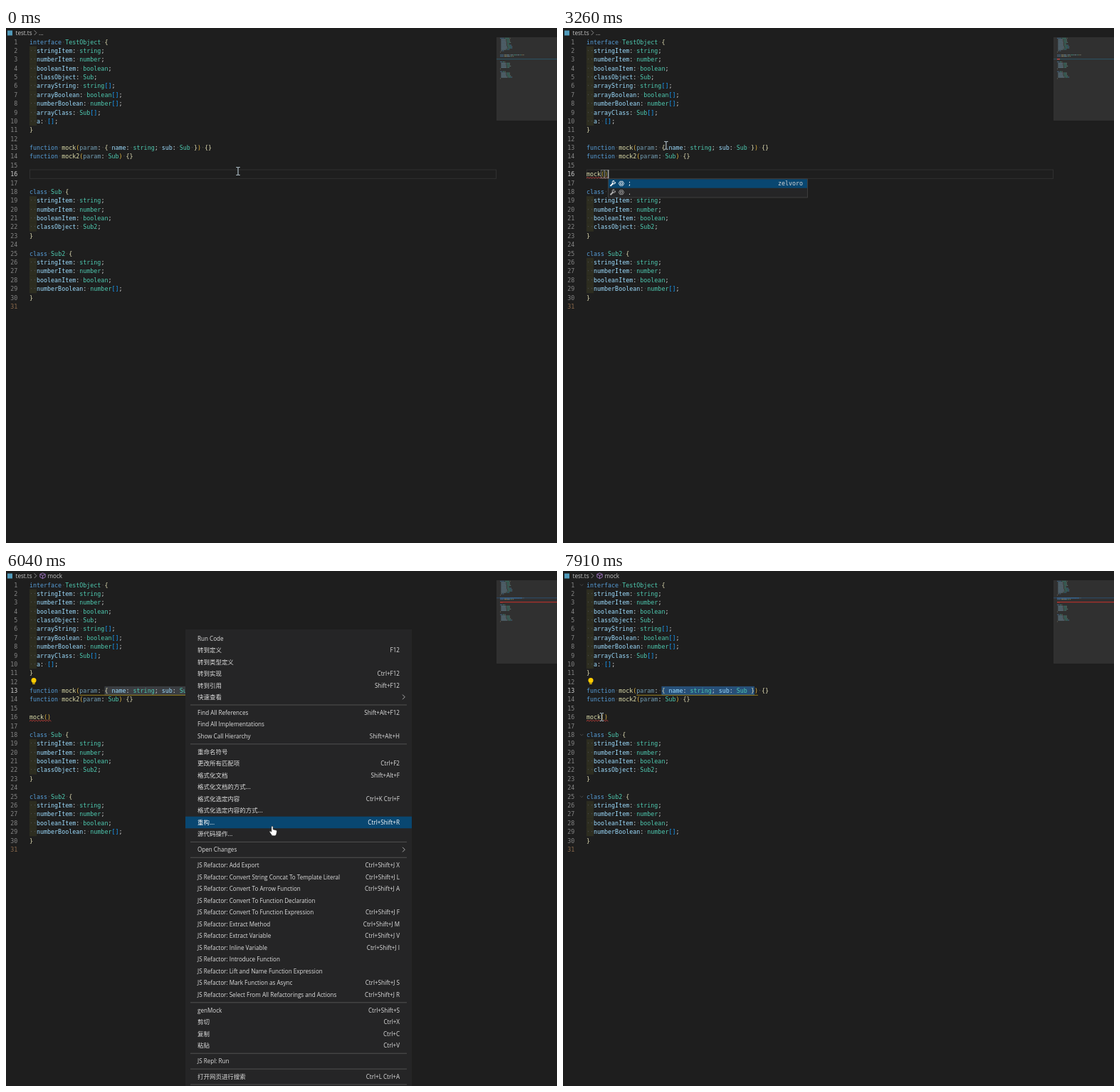
Animation of 774 by 723 pixels, one loop 8 s. Source, as an HTML page:

```html
<!DOCTYPE html>
<html lang="en">
<head>
<meta charset="utf-8">
<title>Editor session</title>
<style>
html, body { margin: 0; width: 100%; height: 100%; overflow: hidden; background: #1e1e1e; }
svg { display: block; width: 774px; height: 723px; }
text { white-space: pre; }
.code { font: 8.34px "DejaVu Sans Mono", "Noto Sans Mono", monospace; }
.ui { font: 8.1px "Open Sans", "Noto Sans CJK SC", sans-serif; }
.cjk { font-size: 8.47px; font-family: "Noto Sans CJK SC", "Noto Sans CJK", sans-serif; }
</style>
</head>
<body>
<svg id="stage" viewBox="0 0 774 723"></svg>
<script>
const LOOP = 8000, LEFT = 33, CHAR = 5.02, ROW = 12.38;
const MENU_ROW = 16.52, MENU_GAP = 5.33;
const stage = document.getElementById('stage');

function make(parent, tag, attrs = {}, text) {
  const node = document.createElementNS('http://www.w3.org/2000/svg', tag);
  for (const key in attrs) node.setAttribute(key, attrs[key]);
  if (text !== undefined) node.textContent = text;
  return parent.appendChild(node);
}
const group = (parent = stage, attrs) => make(parent, 'g', attrs);
const rect = (parent, x, y, width, height, fill, more) =>
  make(parent, 'rect', { x, y, width, height, fill, ...more });
const label = (parent, x, y, text, fill, cls, more) =>
  make(parent, 'text', { x, y, fill, class: cls, ...more }, text);
const line = (parent, d, stroke, width = 0.8, more) =>
  make(parent, 'path', { d, stroke, 'stroke-width': width, fill: 'none', ...more });
const show = (node, on) => node.setAttribute('visibility', on ? 'visible' : 'hidden');
const fade = (node, amount) => node.setAttribute('opacity', amount);
const place = (node, x, y) => node.setAttribute('transform', `translate(${x} ${y})`);

const colX = col => LEFT + col * CHAR;
const rowY = n => 19.5 + (n - 1) * ROW;
const rowTop = n => rowY(n) - ROW / 2;
const miniY = n => 13.9 + (n - 1) * 1.95;

const source = `interface TestObject {
  stringItem: string;
  numberItem: number;
  booleanItem: boolean;
  classObject: Sub;
  arrayString: string[];
  arrayBoolean: boolean[];
  numberBoolean: number[];
  arrayClass: Sub[];
  a: [];
}

function mock(param: { name: string; sub: Sub }) {}
function mock2(param: Sub) {}



class Sub {
  stringItem: string;
  numberItem: number;
  booleanItem: boolean;
  classObject: Sub2;
}

class Sub2 {
  stringItem: string;
  numberItem: number;
  booleanItem: boolean;
  numberBoolean: number[];
}
`.split('\n');

function colorOf(token, next) {
  if (/^\s/.test(token)) return '#494949';
  if (/^(interface|function|class)$/.test(token)) return '#569cd6';
  if (/^\w/.test(token)) return next === ':' ? '#9cdcfe' : next === '(' ? '#dcdcaa' : '#4ec9b0';
  if (/[[\]]/.test(token)) return '#179fff';
  if (/[()]/.test(token)) return '#e2b340';
  return /[{}]/.test(token) ? '#dfdbb2' : '#d4d4d4';
}

// Backgrounds that lie beneath the text
const minimap = group();
rect(minimap, 689, 13, 85, 117, '#303030');
const currentLine = rect(stage, LEFT + 0.5, 0, 655, ROW, 'none', { stroke: '#303030' });
const selection = rect(stage, colX(21), rowTop(13), 0, ROW, '#264f78');
const code = group();
const numbers = [];

source.forEach((content, i) => {
  const n = i + 1, y = rowY(n) + 3;
  numbers.push(label(code, 16.3, y, n, '#858585', 'code', { 'text-anchor': 'end' }));
  if (content.startsWith(' ')) rect(code, LEFT, rowTop(n), 10, ROW, '#2d2d20');
  const row = make(code, 'text', { y, class: 'code' });
  const tokens = content.match(/ +|\w+|\W/g) || [];
  let col = 0;
  tokens.forEach((token, k) => {
    const fill = colorOf(token, tokens[k + 1]);
    const blank = token[0] === ' ';
    make(row, 'tspan', { x: colX(col), fill, 'fill-opacity': token === 'param' ? 0.67 : 1 },
      blank ? '·'.repeat(token.length) : token);
    if (!blank) rect(minimap, 694 + col * 0.66, miniY(n), token.length * 0.66, 1, fill, { opacity: 0.5 });
    col += token.length;
  });
});

const miniCurrent = rect(minimap, 689, 0, 85, 1.3, '#2c5566', { opacity: 0.8 });
const miniSelection = rect(minimap, 694, miniY(13), 0, 1.3, '#35628d');
const miniTyped = rect(minimap, 694, miniY(16), 0, 1.2, '#a5a58a');
const miniError = rect(minimap, 694, miniY(16) - 0.2, 80, 1.4, '#a3302b');

// Breadcrumb
rect(stage, 2, 3.5, 7, 7, '#519aba');
label(stage, 13.6, 9.9, 'test.ts', '#c4c4c4', 'ui');
line(stage, 'M39.7 3.4l3.2 3.3-3.2 3.3', '#a8a8a8');
const crumbDots = label(stage, 46, 9.9, '...', '#c4c4c4', 'ui');
const crumbMock = group();
const cube = (parent, x, y, stroke) =>
  line(parent, `M${x} ${y - 4}l3.7 1.8v4l-3.7 2-3.7-2v-4zM${x - 3.7} ${y - 2.2}l3.7 1.8 3.7-1.8M${x} ${y - 0.4}v4.2`, stroke, 0.8);
cube(crumbMock, 51.5, 6.8, '#b180d7');
label(crumbMock, 58.6, 9.9, 'mock', '#c4c4c4', 'ui');

// Typed call on line 16
const typed = make(stage, 'text', { y: rowY(16) + 3, class: 'code' });
const typedName = make(typed, 'tspan', { x: LEFT, fill: '#dcdcaa' });
const typedParens = make(typed, 'tspan', { x: colX(4), fill: '#e2b340' }, '()');
const squiggle = line(stage, `M${LEFT} 211` + 'l1.9-1.7 1.9 1.7'.repeat(8), '#e0473f', 0.8);

const bracketBox = (parent, col, row) =>
  rect(parent, colX(col) + 0.3, rowTop(row) + 0.6, CHAR - 0.4, ROW - 1.2, '#0640061a', { stroke: '#888', 'stroke-width': 0.7 });
const callBoxes = group();
[4, 5].forEach(col => bracketBox(callBoxes, col, 16));
const paramBoxes = group();
[21, 46].forEach(col => bracketBox(paramBoxes, col, 13));
const pairGuide = line(stage, `M${colX(14)} 174.3H${colX(48)}`, '#a98b1e', 0.9);

const bulb = group();
make(bulb, 'circle', { cx: 39, cy: 153.4, r: 3.5, fill: '#ffcc00' });
rect(bulb, 37.3, 156, 3.4, 3, '#ffcc00');
line(bulb, 'M37.3 157.6h3.4', '#1e1e1e', 0.6);

const folds = group();
[1, 18, 25].forEach(n => line(folds, `M24 ${rowY(n) - 1}l2.2 2.2 2.2-2.2`, '#b0b0b0'));
const caret = rect(stage, 0, 0, 1.3, ROW, '#aeafad');

// Completion lists
function popup(x, rows, drawRow) {
  const box = group();
  rect(box, x, 211.8, 280, rows.length * ROW + 1.4, '#252526', { stroke: '#454545', 'stroke-width': 0.8 });
  rect(box, x + 0.5, 212.3, 279, ROW, '#094771');
  rows.forEach((text, i) => {
    const y = 218.3 + i * ROW;
    drawRow(box, y, i ? '#b0b0b0' : '#fff');
    label(box, x + (x > 50 ? 27.5 : 17), y + 3, text, i ? '#d4d4d4' : '#fff', 'code');
  });
  return box;
}
const nameIcon = (box, y) => cube(box, 42, y, '#b180d7');
const names = 'mock mock2 module Map Math MediaError MediaList MessageEvent MimeType MouseEvent moveBy moveTo'.split(' ');
const longList = popup(33.5, names, nameIcon);
const shortList = popup(33.5, ['mock', 'mock2', 'MouseEvent', 'module', 'moveBy', 'moveTo'], nameIcon);
const endList = popup(63.5, [';', '.'], (box, y, color) => {
  line(box, `M66.5 ${y + 3.6}l4.2-4.2`, color, 2);
  line(box, `M73.7 ${y - 1.8}a2.3 2.3 0 1 1-2-2.2l-.5 1.8 1 1z`, color, 0.9);
  line(box, `M80 ${y - 3}h4l1.7 3-1.7 3h-4l-1.7-3zM80.4 ${y - 1.2}h3.2v2.4h-3.2z`, color, 0.8);
});
label(endList, 337, 221.3, 'zelvoro', '#d4d4d4', 'code', { 'text-anchor': 'end' });

// Context menu
const menuText = `Run Code
转到定义|F12
转到类型定义
转到实现|Ctrl+F12
转到引用|Shift+F12
快速查看|>
-
Find All References|Shift+Alt+F12
Find All Implementations
Show Call Hierarchy|Shift+Alt+H
-
重命名符号
更改所有匹配项|Ctrl+F2
格式化文档|Shift+Alt+F
格式化文档的方式...
格式化选定内容|Ctrl+K Ctrl+F
格式化选定内容的方式...
重构...|Ctrl+Shift+R
源代码操作...
-
Open Changes|>
-
JS Refactor: Add Export|Ctrl+Shift+J X
JS Refactor: Convert String Concat To Template Literal|Ctrl+Shift+J L
JS Refactor: Convert To Arrow Function|Ctrl+Shift+J A
JS Refactor: Convert To Function Declaration
JS Refactor: Convert To Function Expression|Ctrl+Shift+J F
JS Refactor: Extract Method|Ctrl+Shift+J M
JS Refactor: Extract Variable|Ctrl+Shift+J V
JS Refactor: Inline Variable|Ctrl+Shift+J I
JS Refactor: Introduce Function
JS Refactor: Lift and Name Function Expression
JS Refactor: Mark Function as Async|Ctrl+Shift+J S
JS Refactor: Select From All Refactorings and Actions|Ctrl+Shift+J R
-
genMock|Ctrl+Shift+S
剪切|Ctrl+X
复制|Ctrl+C
粘贴|Ctrl+V
-
JS Repl: Run
-
打开网页进行搜索|Ctrl+L Ctrl+A
-`;
const menu = group();
rect(menu, 252, 82, 318, 641, '#252526');
const menuHover = rect(menu, 252, 0, 318, MENU_ROW, '#094771');
const menuRows = [];
let menuY = 94.5;
for (const entry of menuText.split('\n')) {
  if (entry === '-') {
    line(menu, `M259 ${menuY - 5.6}H563`, '#5c5c5c');
    menuY += MENU_GAP;
    continue;
  }
  const [name, keys] = entry.split('|');
  const item = group(menu);
  const cjk = name.charCodeAt(0) > 255;
  make(item, 'text', { x: 269, y: menuY + 3, class: cjk ? 'ui cjk' : 'ui' }, name);
  if (keys === '>') line(item, `M557 ${menuY - 3.5}l3.3 3.3-3.3 3.3`, '#ccc');
  else if (keys) make(item, 'text', { x: 553, y: menuY + 3, class: 'ui', 'text-anchor': 'end' }, keys);
  menuRows.push({ y: menuY, item });
  menuY += MENU_ROW;
}

// Pointer shapes
const clickDot = make(stage, 'circle', { r: 8, fill: '#e0d800', opacity: 0.68 });
const beam = group();
const beamPath = 'M-2.6-5.4h1.8L0-4.8.8-5.4h1.8M0-4.8V4.8M-2.6 5.4h1.8L0 4.8l.8.6h1.8';
line(beam, beamPath, '#10151a', 1.8);
line(beam, beamPath, '#d5e4ea', 1);
const hand = group();
make(hand, 'path', {
  d: 'M-1.2.8q1.2-1.6 2.4 0v4l4 1q1.6.5 1.4 2l-.8 3.6q-.4 2-2 2.4h-3q-1 0-1.8-1.2l-3-4.5q0-1.6 1.8-.8l1 1z',
  fill: '#fff', stroke: '#111', 'stroke-width': 0.6
});
const arrow = group();
make(arrow, 'path', { d: 'M0 0v10.5l-2.5-2.2-1.8 4-1.6-.7 1.7-3.9h-3.4z', fill: '#fff', stroke: '#111', 'stroke-width': 0.6 });

const route = [
  [2350, 326, 201], [2780, 225, 112], [3180, 146, 164], [3500, 139, 169],
  [4940, 139, 169], [5250, 270, 166], [5420, 270, 166], [5660, 251, 168],
  [5870, 251, 168], [6040, 374, 358], [6590, 318, 614], [6670, 317, 614.5],
  [6980, 317, 614.5], [7420, 22, 245], [7580, 24, 214], [7750, 54.5, 205]
];
const between = (t, from, to) => t >= from && t < to;
const ramp = (t, from, to) => {
  const u = Math.min(1, Math.max(0, (t - from) / (to - from)));
  return u * u * (3 - 2 * u);
};
function pointerAt(t) {
  const next = route.findIndex(stop => stop[0] > t);
  if (next === 0) return route[0].slice(1);
  if (next < 0) return route[route.length - 1].slice(1);
  const a = route[next - 1], b = route[next], u = ramp(t, a[0], b[0]);
  return [a[1] + (b[1] - a[1]) * u, a[2] + (b[2] - a[2]) * u];
}
function blink(t) {
  const u = ((t % 1000) + 1000) % 1000;
  return 1 - ramp(u, 100, 300) + ramp(u, 700, 900);
}
function caretOpacity(t) {
  if (t < 520) return blink(t + 660);
  if (t < 2300) return 1;
  if (t < 4100) return blink(t - 2300);
  if (t < 4940) return blink(t - 3800);
  return t < 5420 ? 1 : blink(t - 5420);
}

function draw(t) {
  const [x, y] = pointerAt(t);
  const clicked = t >= 4100, selecting = t >= 4940;
  const menuOpen = between(t, 5890, 6980);
  const activeRow = clicked ? 13 : 16;

  // Typing
  const letters = [520, 840, 1050, 1390].filter(at => t >= at).length;
  typedName.textContent = 'mock'.slice(0, letters);
  show(typedParens, t >= 1620);
  show(squiggle, t >= 2090);
  show(callBoxes, between(t, 1620, 4100));
  show(longList, between(t, 600, 1220));
  show(shortList, between(t, 1220, 1620));
  show(endList, between(t, 1800, 4100));
  const typedCols = t >= 1710 ? 6 : t >= 1620 ? 5 : letters;

  // Editor state
  numbers.forEach((node, i) => node.setAttribute('fill',
    i + 1 === activeRow ? '#d0d0d0' : i === 30 ? '#8b6a4c' : '#858585'));
  show(currentLine, !selecting);
  currentLine.setAttribute('y', rowTop(activeRow));
  const cols = selecting ? Math.min(26, Math.max(0, Math.round((x - colX(21)) / CHAR))) : 0;
  const selected = t >= 5250 ? 26 : cols;
  selection.setAttribute('width', selected * CHAR);
  selection.setAttribute('fill', menuOpen ? '#3a3d41' : '#264f78');
  show(paramBoxes, clicked && !selecting);
  show(pairGuide, clicked);
  show(bulb, t >= 5200);
  show(crumbDots, t < 4600);
  show(crumbMock, t >= 4600);
  caret.setAttribute('x', clicked ? colX(21 + selected) : colX(typedCols));
  caret.setAttribute('y', rowTop(activeRow));
  fade(caret, menuOpen ? 0 : caretOpacity(t));
  fade(folds, ramp(t, 7380, 7600) * (1 - 0.7 * ramp(t, 7650, 7950)));

  // Minimap
  miniCurrent.setAttribute('y', miniY(activeRow) - 0.2);
  miniCurrent.setAttribute('fill', clicked ? '#2d4d6b' : '#2c5566');
  miniSelection.setAttribute('width', selected ? (21 + selected) * 0.66 : 0);
  miniTyped.setAttribute('width', (t >= 1620 ? 6 : letters) * 0.66);
  miniTyped.setAttribute('fill', t >= 2090 ? '#e0443e' : '#a5a58a');
  show(miniError, clicked);

  // Menu
  show(menu, menuOpen);
  const hovered = menuOpen && x > 253 && menuRows.find(row => Math.abs(row.y - y) <= MENU_ROW / 2);
  show(menuHover, hovered);
  if (hovered) menuHover.setAttribute('y', hovered.y - MENU_ROW / 2);
  menuRows.forEach(row => row.item.setAttribute('fill', row === hovered ? '#fff' : '#dedede'));

  // Pointer
  const shape = menuOpen && x > 252 ? hand : x < 31 ? arrow : beam;
  for (const node of [beam, hand, arrow]) show(node, node === shape);
  place(shape, x, y);
  place(clickDot, x, y + 0.5);
  show(clickDot, between(t, 4100, 5420) || between(t, 5810, 5920) || between(t, 6900, 6980));
}

const start = performance.now();
function tick() {
  draw((performance.now() - start) % LOOP);
  requestAnimationFrame(tick);
}
tick();
</script>
</body>
</html>
```
